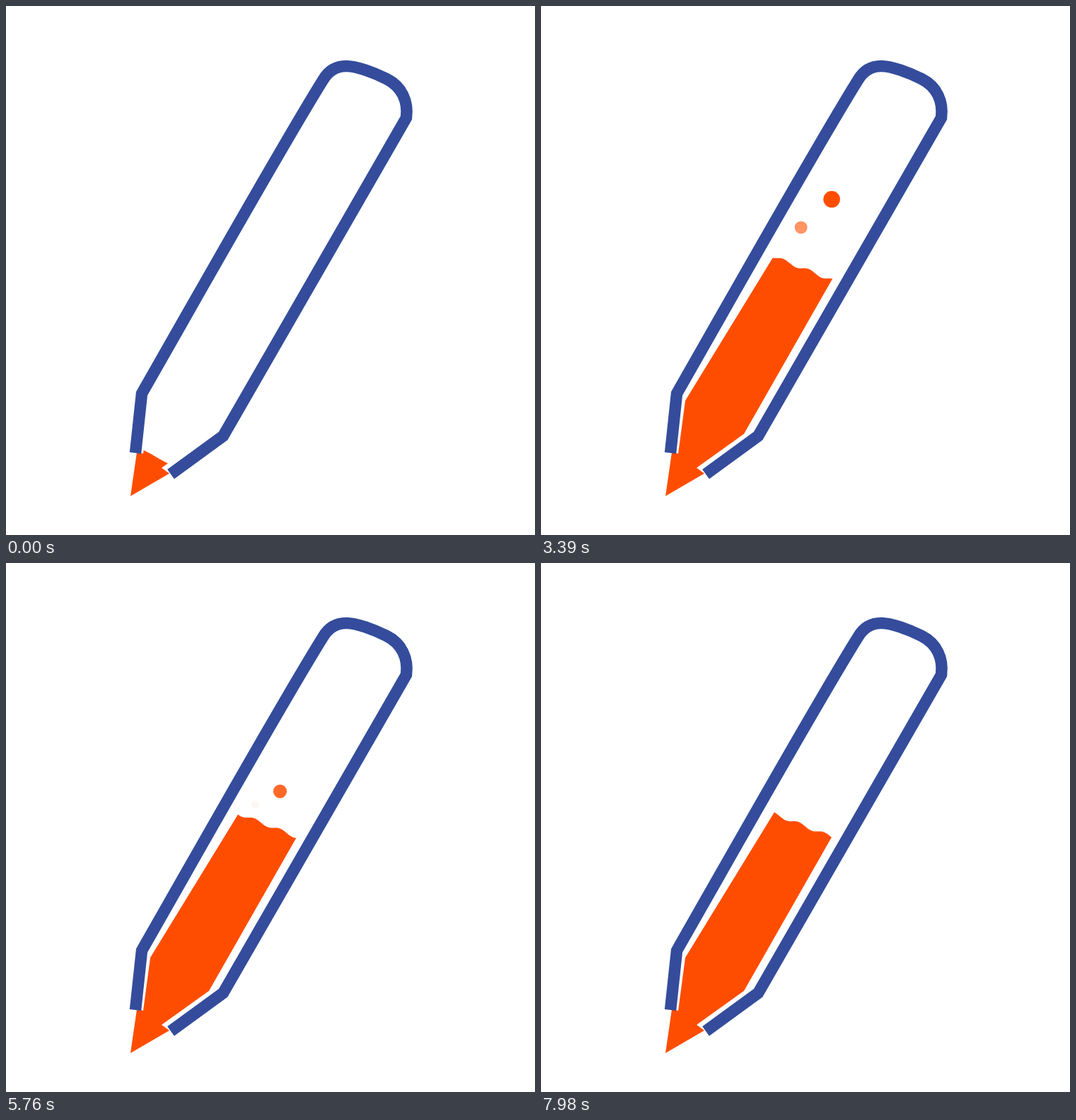
These frames come from a looping animation (748x748 px, 8000 ms). An HTML page with a canvas:

```html
<!DOCTYPE html>
<html lang="en">
<head>
<meta charset="utf-8">
<title>Filling pencil</title>
<style>
  html, body { margin: 0; width: 100%; height: 100%; overflow: hidden; background: #fff; }
  canvas { display: block; width: 748px; height: 748px; }
</style>
</head>
<body>
<canvas id="stage" width="748" height="748"></canvas>
<script>
const ctx = document.getElementById('stage').getContext('2d');
const SIZE = 748, BLUE = '#344c9b', ORANGE = '#ff4d00';
const LOOP = 8000, FILL_TIME = 2700;
const BUBBLE_CYCLE = 2640, BUBBLE_LIFE = 1440, FADE = 480;

const outline = new Path2D(
  'M183 632L192 548C280 394 390 198 448 105C456 91 468 85 481 85' +
  'C496 85 520 94 538 103C560 114 569 135 566 158L307 608L233 662');
const tank = new Path2D(
  'M176 693L185 631L194 633L204 558L449 158L542 158L287 605L220 653L231 661Z');

// Each lane is a cubic curve travelled at an even rate.
const leftLane = { x: [352.5, 349, 512, 476], y: [343, 315, 163, 146], r: [5.2, 24] };
const rightLane = { x: [374, 368, 454, 485], y: [354, 368, 158, 183], r: [6.3, 18] };
const bubbles = [
  { delay: 15, lane: rightLane },
  { delay: 400, lane: leftLane },
  { delay: 800, lane: leftLane },
  { delay: 1200, lane: leftLane }
];

const mix = (a, b, u) => a + (b - a) * u;
const easeInOut = u => (1 - Math.cos(Math.PI * u)) / 2;

function cubic([a, b, c, d], u) {
  const v = 1 - u;
  return a * v * v * v + 3 * b * v * v * u + 3 * c * v * u * u + d * u * u * u;
}

function drawLiquid(t) {
  const fill = easeInOut(Math.min(t / FILL_TIME, 1));
  const cx = mix(212, 370, fill), cy = mix(637.5, 371, fill);
  const wavelength = mix(86, 36, fill);
  const phase = 2.5 - 0.00074 * t;

  ctx.save();
  ctx.clip(tank);
  ctx.beginPath();
  ctx.moveTo(0, SIZE);
  for (let x = 0; x <= SIZE; x++) {
    const dx = x - cx;
    const wave = 2.5 * Math.sin(2 * Math.PI * (dx / wavelength - phase));
    ctx.lineTo(x, cy + 0.4 * dx - wave);
  }
  ctx.lineTo(SIZE, SIZE);
  ctx.fill();
  ctx.restore();
}

function drawBubbles(t) {
  if (t < FILL_TIME) return;
  const cycleTime = (t - FILL_TIME) % BUBBLE_CYCLE;
  for (const { delay, lane } of bubbles) {
    const age = cycleTime - delay;
    if (age <= 0 || age >= BUBBLE_LIFE) continue;
    const u = age / BUBBLE_LIFE;
    ctx.globalAlpha = Math.min(1, age / FADE, (BUBBLE_LIFE - age) / FADE);
    ctx.beginPath();
    ctx.arc(cubic(lane.x, u), cubic(lane.y, u), mix(...lane.r, u), 0, 2 * Math.PI);
    ctx.fill();
  }
  ctx.globalAlpha = 1;
}

function draw(t) {
  ctx.fillStyle = '#fff';
  ctx.fillRect(0, 0, SIZE, SIZE);
  ctx.fillStyle = ORANGE;
  drawLiquid(t);
  drawBubbles(t);
  ctx.strokeStyle = BLUE;
  ctx.lineWidth = 16.5;
  ctx.stroke(outline);
}

let start;
function tick(now) {
  start ??= now;
  draw((now - start) % LOOP);
  requestAnimationFrame(tick);
}
draw(0);
requestAnimationFrame(tick);
</script>
</body>
</html>
```
